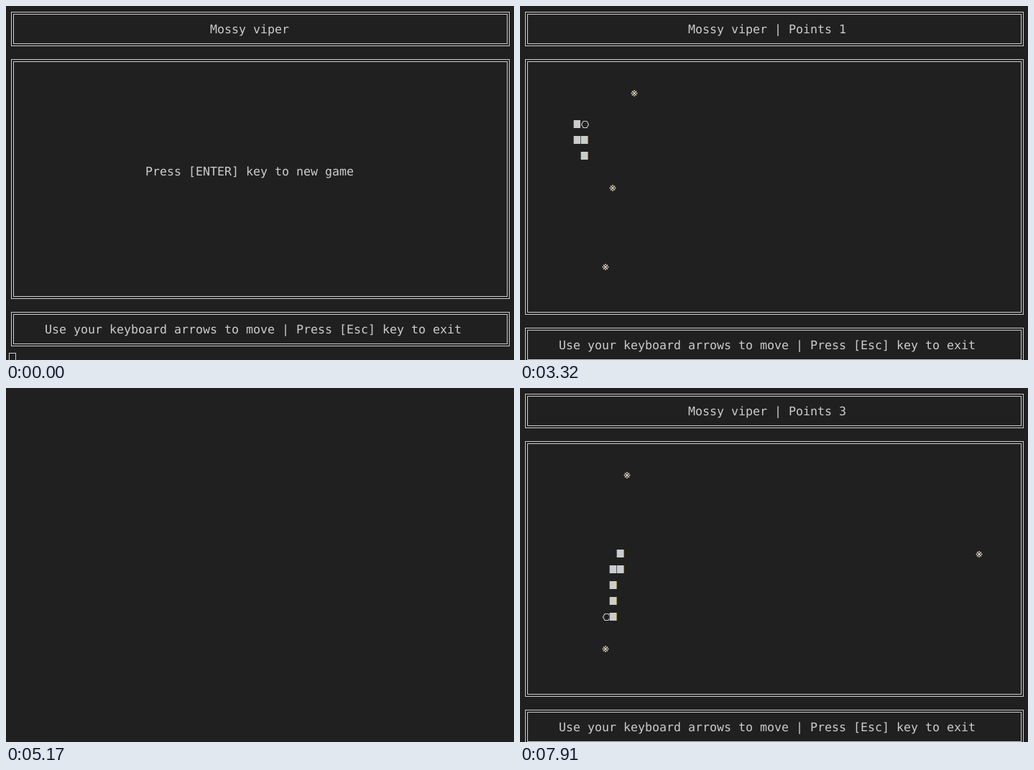
An HTML page that plays this animation: 707x493 px, repeating every 8 s.

```html
<!DOCTYPE html>
<html lang="en">
<head>
<meta charset="utf-8">
<title>Terminal game</title>
<style>
  html, body { margin: 0; width: 100%; height: 100%; overflow: hidden; background: #202020; }
  svg { display: block; width: 707px; height: 493px; }
  text {
    font: 16.61px "DejaVu Sans Mono", "Noto Sans Mono", monospace;
    fill: #ccc;
    text-rendering: geometricPrecision;
  }
</style>
</head>
<body>
<svg id="stage" viewBox="0 0 707 493"></svg>
<script>
const LOOP = 8000, BG = '#202020', INK = '#ccc', FOOD = '#f2e4cc';
const NAME = 'Mossy viper';
const stage = document.getElementById('stage');

// Character grid: 10 by 22 px cells
const px = c => 4 + 10 * c;
const py = r => 10 + 22 * r;

const rect = (x, y, w, h, fill) =>
  `<rect x="${x}" y="${y}" width="${w}" height="${h}" fill="${fill}"/>`;
const frame = (x, y, w, h) =>
  `<rect x="${x}" y="${y}" width="${w}" height="${h}" fill="none" stroke="${INK}"/>`;
const label = (c, r, s) => `<text x="${px(c)}" y="${py(r) + 6}">${s}</text>`;

function panel(top, bottom) {
  const y = py(top) - 1.5, h = 22 * (bottom - top) + 3;
  return frame(7.5, y, 693, h) + frame(10.5, y + 3, 687, h - 6);
}

function layout(title, col, end) {
  return panel(0, 2) + panel(3, end) + panel(end + 1, end + 3) +
    label(col, 1, title) +
    label(5, end + 2, 'Use your keyboard arrows to move | Press [Esc] key to exit');
}

function food([c, r]) {
  const x = px(c) + 5, y = py(r) + 1.5;
  const dot = (dx, dy) => `<circle cx="${x + dx}" cy="${y + dy}" r="0.9" fill="${FOOD}"/>`;
  return `<path d="M${x - 3} ${y - 3}l6 6m0 -6l-6 6" stroke="${FOOD}" stroke-width="1.1"/>` +
    dot(0, -3.5) + dot(0, 3.5) + dot(-3.5, 0) + dot(3.5, 0);
}

// Blocks have a cool left and a warm right edge, like subpixel text
function block([c, r]) {
  const x = px(c), y = py(r) - 5;
  return rect(x, y, 1, 11, '#4a5866') + rect(x + 1, y, 9, 11, INK) + rect(x + 10, y, 1, 11, '#a9843f');
}

function head([c, r]) {
  const x = px(c), y = py(r);
  return rect(x, y - 5, 10, 11, BG) +
    `<path d="M${x + 1.5} ${y + 1}l2.6 -4.5h4.8l2.6 4.5l-2.6 4.5h-4.8z" fill="none" stroke="${INK}" stroke-width="1.1"/>`;
}

// The round as a recording: letters are moves, # clears the screen, a dot waits one beat
const PLAY = '.......#R.U....L..#U......R...#U..R.R..U..#R.R.R.R.R' +
  '..#D......DD....L.#L.D.D#D.L......D.D...#D.#L';
const STEP = { R: [1, 0], L: [-1, 0], U: [0, -1], D: [0, 1] };
const NEXT_FOOD = [[12, 11], [63, 10], [14, 5]];
const BEAT = 66.4, LEAD = 10, FOCUS = 4, START = 24;

function move({ snake, foods, points }, key) {
  const [x, y] = snake[0], [dx, dy] = STEP[key];
  const tip = [x + dx, y + dy];
  snake = [tip, ...snake.slice(0, -1)];
  const hit = foods.findIndex(f => String(f) === String(tip));
  if (hit < 0) return { snake, foods, points };
  // the new segment continues the line of the tail
  const [a, b] = snake.slice(-2);
  return {
    snake: [...snake, [2 * b[0] - a[0], 2 * b[1] - a[1]]],
    foods: foods.map((f, i) => i === hit ? NEXT_FOOD[points] : f),
    points: points + 1
  };
}

function startScreen(focused) {
  return layout(NAME, 28, 18) +
    label(19, 10, 'Press [ENTER] key to new game') +
    (focused ? rect(4, 483, 10, 12, INK) : frame(4.5, 483.5, 9, 18));
}

function gameScreen({ snake, foods, points }) {
  // left to right, so each cell covers what its neighbour spills over
  const cells = snake.map((cell, i) => ({ cell, draw: i ? block : head }))
    .sort((a, b) => a.cell[0] - b.cell[0]);
  return layout(`${NAME} | Points ${points}`, 23, 19) +
    foods.map(food).join('') +
    cells.map(s => s.draw(s.cell)).join('');
}

// One screen per beat; adjacent letters share a beat
function record() {
  let state = {
    snake: [7, 6, 5, 4].map(c => [c, 9]),
    foods: [[15, 5], [7, 7], [11, 16]],
    points: 0
  };
  return PLAY.match(/[A-Z]+|./g).map(beat => {
    if (beat === '#') return '';
    if (beat !== '.') state = [...beat].reduce(move, state);
    return gameScreen(state);
  });
}
const screens = record();

function picture(t) {
  const beat = Math.floor((t + LEAD) / BEAT);
  if (beat < START) return startScreen(beat >= FOCUS);
  return screens[Math.min(beat - START, screens.length - 1)];
}

let shown = null;
function render(t) {
  const next = picture(t);
  if (next !== shown) stage.innerHTML = shown = next;
}

const began = performance.now();
function tick() {
  render((performance.now() - began) % LOOP);
  requestAnimationFrame(tick);
}
tick();
</script>
</body>
</html>
```
